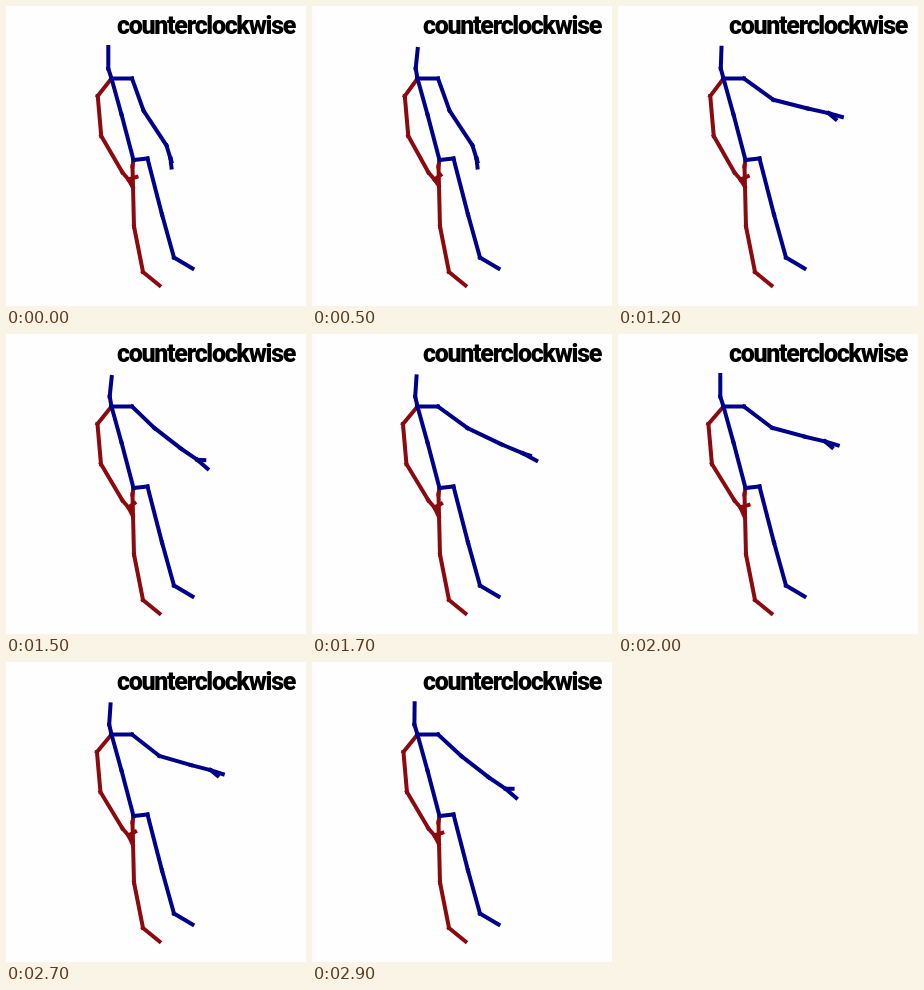
Animation of 300x300 px, one loop 3000 ms. Source, as an HTML page with a canvas:

```html
<!DOCTYPE html>
<html>
<head>
<meta charset="utf-8">
<style>
  html, body { margin: 0; width: 100%; height: 100%; overflow: hidden; background: #fefefe; }
  canvas { display: block; }
</style>
</head>
<body>
<canvas id="stage" width="300" height="300"></canvas>
<script>
const ctx = document.getElementById('stage').getContext('2d');
const RED = '#8b0a0f', BLUE = '#00008b';
const LOOP = 3000, STEP = 100, TAU = 2 * Math.PI;
const SHOULDER = [125.5, 72];

// Right elbow, wrist, hand and fingertip: hanging, and at the centre of the circling
const HANGING = [[137, 104], [160, 139], [164, 152], [165, 161]];
const RAISED = [[152, 93.5], [183, 108.5], [202, 116.5], [214, 123]];

const mix = (a, b, k) => a + (b - a) * k;
const clamp = k => Math.max(0, Math.min(1, k));

// The circling pace varies slightly: [time, degrees]
const TURN = [[1200, 50], [1700, 312], [2400, 585], [2900, 945]];

function turnAt(t) {
  const i = t < 1700 ? 0 : t < 2400 ? 1 : 2;
  const [t0, a] = TURN[i], [t1, b] = TURN[i + 1];
  return mix(a, b, (t - t0) / (t1 - t0)) * TAU / 360;
}

// Joints farther from the shoulder swing wider; the vertical swing leads the horizontal
function rightArm(t) {
  const raise = clamp((t - 600) / 470);
  const turn = turnAt(t), out = Math.cos(turn), up = Math.sin(turn + 0.6);
  const joints = RAISED.map(([x, y], i) => [
    mix(HANGING[i][0], x + (x - SHOULDER[0]) * 0.165 * out, raise),
    mix(HANGING[i][1], y - (y - 93) * 0.42 * up, raise)
  ]);
  const [hx, hy] = joints[2];
  return { joints, thumb: [hx + mix(1, 7, raise), hy + 3 + 3 * up * raise] };
}

// Each bone is its own stroke so the square caps show at the joints
function bones(color, ...points) {
  ctx.strokeStyle = color;
  for (let i = 1; i < points.length; i++) {
    ctx.beginPath();
    ctx.moveTo(...points[i - 1]);
    ctx.lineTo(...points[i]);
    ctx.stroke();
  }
}

function draw(t) {
  const nod = -Math.cos(t / 1000 * TAU);
  const sway = Math.cos((t - 700) / LOOP * TAU);
  const { joints, thumb } = rightArm(t);
  const chest = [105, 72], pelvis = [127, 153.5], handL = [122, 173];
  const elbowL = 94.6 + 1.3 * sway;

  ctx.fillStyle = '#fefefe';
  ctx.fillRect(0, 0, 300, 300);
  ctx.lineWidth = 4;
  ctx.lineCap = 'square';

  ctx.save();
  ctx.translate(0.5, 0.5);
  bones(RED, chest, [elbowL - 3.5, 89.5], [elbowL, 129.5], [116, 166], handL, [126.3, 181 - 2 * sway]);
  bones(RED, handL, [129 - nod, 169.5 - nod]);
  bones(RED, pelvis, [126, 160], [127.5, 220], [136.5, 265.5], [153, 279]);

  bones(BLUE, [103.5 + 1.7 * nod, 41.5 + nod], [102.5 + 0.7 * nod, 62], chest, [115, 108], pelvis);
  bones(BLUE, chest, SHOULDER, ...joints);
  bones(BLUE, joints[2], thumb);
  bones(BLUE, pelvis, [141, 152], [155.5, 208], [167.5, 251], [186, 262]);
  ctx.restore();

  ctx.fillStyle = '#000';
  ctx.font = '900 25px Roboto, sans-serif';
  ctx.letterSpacing = '-1.3px';
  ctx.fillText('counterclockwise', 111, 28);
}

function tick(now) {
  draw(Math.floor(now % LOOP / STEP) * STEP);
  requestAnimationFrame(tick);
}
tick(performance.now());
</script>
</body>
</html>
```
